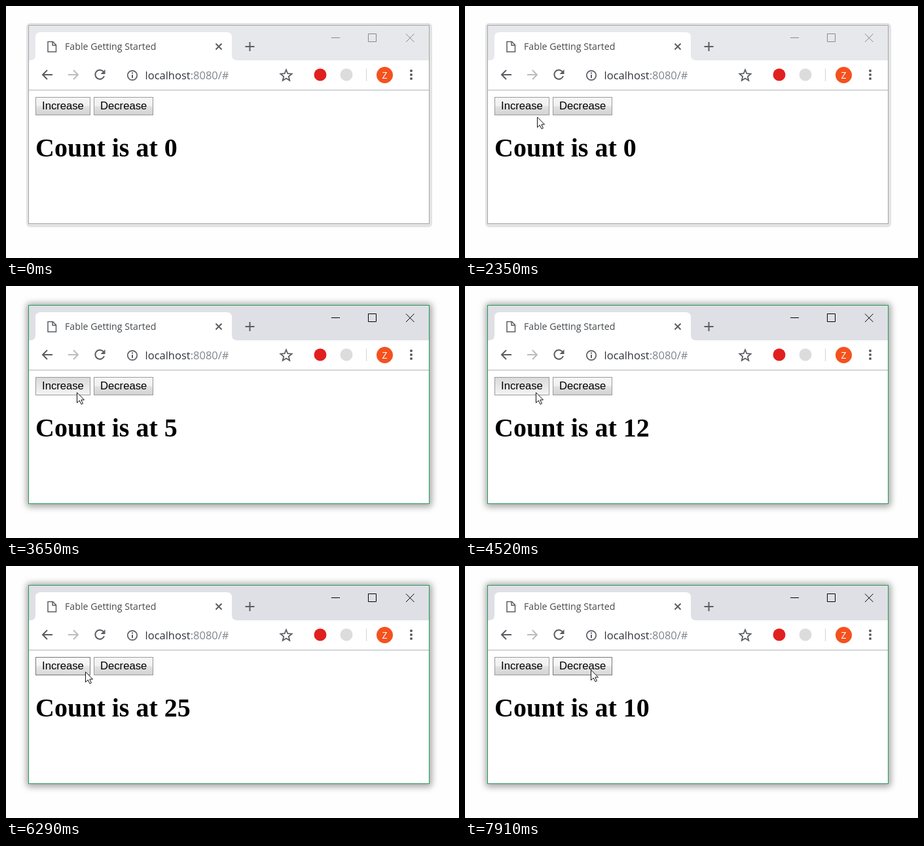
An HTML page for the animation above (8000 ms loop, 692 by 385 pixels).

```html
<!DOCTYPE html>
<html lang="en">
<head>
<meta charset="utf-8">
<title>Counter</title>
<style>
  html, body { margin: 0; width: 100%; height: 100%; overflow: hidden; background: #fefefe; }
  svg { display: block; width: 692px; height: 385px; }
  .ui { font-family: "Open Sans", "Noto Sans", sans-serif; }
  .icon { fill: none; stroke: #5a5d62; stroke-width: 2; }
  .button { font: 16.67px "Liberation Sans", Arial, sans-serif; }
  .button rect { fill: url(#raised); stroke: #9a9a9a; }
  .button.hover rect { fill: url(#hovered); stroke: #777; }
  .button.pressed rect { fill: url(#sunken); stroke: #999; }
  #shadow { fill: #e3e3e3; }
  #frame { fill: #fff; stroke: #a5a5a5; }
  #bar { fill: #e7e8eb; }
  #controls { fill: none; stroke: #888; stroke-width: 1; }
  .active #shadow { fill: #aaa; filter: url(#soft); }
  .active #frame { stroke: #25995a; }
  .active #bar { fill: #dee0e5; }
  .active #controls { stroke: #000; }
</style>
</head>
<body>
<svg id="stage" viewBox="0 0 692 385">
  <defs>
    <linearGradient id="raised" x2="0" y2="1">
      <stop offset="0" stop-color="#f6f6f6"/><stop offset=".48" stop-color="#f0f0f0"/>
      <stop offset=".52" stop-color="#e2e2e2"/><stop offset="1" stop-color="#d2d2d2"/>
    </linearGradient>
    <linearGradient id="hovered" x2="0" y2="1">
      <stop offset="0" stop-color="#fafafa"/><stop offset=".48" stop-color="#f3f3f3"/>
      <stop offset=".52" stop-color="#e6e6e6"/><stop offset="1" stop-color="#d8d8d8"/>
    </linearGradient>
    <linearGradient id="sunken" x2="0" y2="1">
      <stop offset="0" stop-color="#dadada"/><stop offset="1" stop-color="#f4f4f4"/>
    </linearGradient>
    <filter id="soft" x="-10%" y="-10%" width="120%" height="120%"><feGaussianBlur stdDeviation="5"/></filter>
  </defs>

  <rect id="shadow" x="31" y="26" width="620" height="312" rx="6"/>
  <rect id="frame" x="34.5" y="29.5" width="612" height="303"/>
  <rect id="bar" x="35" y="30" width="611" height="53"/>
  <path fill="#fff" d="M37 83q8 0 8-8V48q0-8 8-8H337q8 0 8 8V75q0 8 8 8z"/>
  <path stroke="#b2b4b7" d="M35 128.5H646"/>

  <g class="ui">
    <text x="90" y="67" font-size="14.2" fill="#45494d">Fable Getting Started</text>
    <text x="212.5" y="112" font-size="16.5" fill="#303338">localhost<tspan fill="#80868b">:8080/#</tspan></text>
    <circle cx="578.5" cy="105.5" r="12.5" fill="#f4511e"/>
    <text x="578.5" y="110.5" font-size="14" fill="#fff" text-anchor="middle">Z</text>
  </g>

  <g class="icon">
    <path stroke-width="1.5" d="M64 54.5H71.5L76.5 59.5V70H64zM71 54.5V60H76.5"/>
    <path d="M320.5 57.5l9 9m0-9l-9 9M365.5 62h14M372.5 55v14"/>
    <path d="M71 105H56.5M63 98l-7 7 7 7"/>
    <path stroke="#babcbe" d="M95 105h14.5M103 98l7 7-7 7"/>
    <path d="M148.5 100A7 7 0 1 0 150 107"/>
    <path fill="#5a5d62" stroke="none" d="M151.5 97v7h-7z"/>
    <circle cx="193" cy="106" r="7.2" stroke-width="1.7"/>
    <path d="M193 105v5M193 101.5v2"/>
    <path id="star" stroke-width="1.8"/>
    <path stroke="#d3d5d8" stroke-width="1" d="M550.5 95.5V115"/>
    <g fill="#5a5d62" stroke="none">
      <circle cx="619" cy="99" r="2"/><circle cx="619" cy="105" r="2"/><circle cx="619" cy="111" r="2"/>
    </g>
  </g>
  <circle cx="480" cy="105" r="9.5" fill="#e0201f"/>
  <circle cx="520" cy="105" r="9.5" fill="#dcdcdc"/>
  <path id="controls" d="M497 48.5h13M553.5 42.5h12v12h-12zM611 42.5l12.5 12.5m0-12.5l-12.5 12.5"/>

  <g class="button" id="increase">
    <rect x="45.5" y="139.5" width="83" height="27"/><text x="55" y="158">Increase</text>
  </g>
  <g class="button" id="decrease">
    <rect x="134.5" y="139.5" width="90" height="27"/><text x="144" y="158">Decrease</text>
  </g>
  <text id="count" x="45" y="230" font-family="'Liberation Serif', 'Times New Roman', serif" font-weight="bold" font-size="40"></text>

  <g id="pointer">
    <path id="arrow" fill="#fff" stroke="#111" d="M.5.8V16.5L4.2 13 7 18.7 9.4 17.6 6.8 12H11.5z"/>
    <path id="beam" fill="none" stroke="#333" d="M-3.5-7.5h2.5l1 1 1-1h2.5M0-6.5v13M-3.5 7.5h2.5l1-1 1 1h2.5"/>
  </g>
</svg>
<script>
const LOOP = 8000;
const ACTIVATED = 2620;
const $ = id => document.getElementById(id);

// Each move: start, end, step length, from, to, easing power (1 is linear)
const moves = [
  [370, 1150, 65, [501, 361], [244, 277], 1],
  [1180, 1960, 65, [244, 277], [117, 189], 2.5],
  [2060, 2500, 67, [117, 189], [108, 162], 1.5],
  [6130, 6900, 59.2, [108, 162], [192, 158], 1]
];
const presses = [
  ["increase", ACTIVATED, 2800], ["increase", 3650, 3740], ["increase", 4520, 4680],
  ["increase", 5520, 5680], ["decrease", 7270, 7430], ["decrease", 7800, 7910]
];
const counts = [[0, 0], [2800, 5], [3740, 12], [4680, 18], [5680, 25], [7430, 18], [7910, 10]];

const starPoints = Array.from({ length: 10 }, (_, i) => {
  const angle = (i / 5 - 0.5) * Math.PI, radius = i % 2 ? 4 : 9;
  return [428 + radius * Math.cos(angle), 106.5 + radius * Math.sin(angle)];
});
$("star").setAttribute("d", `M${starPoints.join("L")}z`);

function pointerAt(time) {
  const [start, end, step, from, to, power] = moves.findLast(move => time >= move[0]) || moves[0];
  const elapsed = Math.floor((time - start) / step + 0.01) * step;
  const progress = Math.min(1, Math.max(0, (elapsed + 1) / (end - start)));
  const eased = 1 - (1 - progress) ** power;
  return from.map((value, axis) => Math.round(value + (to[axis] - value) * eased));
}

function render(time) {
  const [x, y] = pointerAt(time);
  const overText = x > 45 && x < 262 && y > 194 && y < 241;
  $("pointer").setAttribute("transform", overText ? `translate(${x + 0.5} ${y + 0.5})` : `translate(${x} ${y})`);
  $("pointer").style.display = time < 370 ? "none" : "";
  $("arrow").style.display = overText ? "none" : "";
  $("beam").style.display = overText ? "" : "none";

  $("stage").classList.toggle("active", time >= ACTIVATED);
  $("count").textContent = "Count is at " + counts.findLast(([at]) => time >= at)[1];

  for (const [id, left, right] of [["increase", 45, 129], ["decrease", 134, 225]]) {
    const pressed = presses.some(([name, from, to]) => name === id && time >= from && time < to);
    $(id).classList.toggle("pressed", pressed);
    $(id).classList.toggle("hover", x >= left && x < right && y >= 139 && y < 167);
  }
}

function tick() {
  render(performance.now() % LOOP);
  requestAnimationFrame(tick);
}
tick();
</script>
</body>
</html>
```
